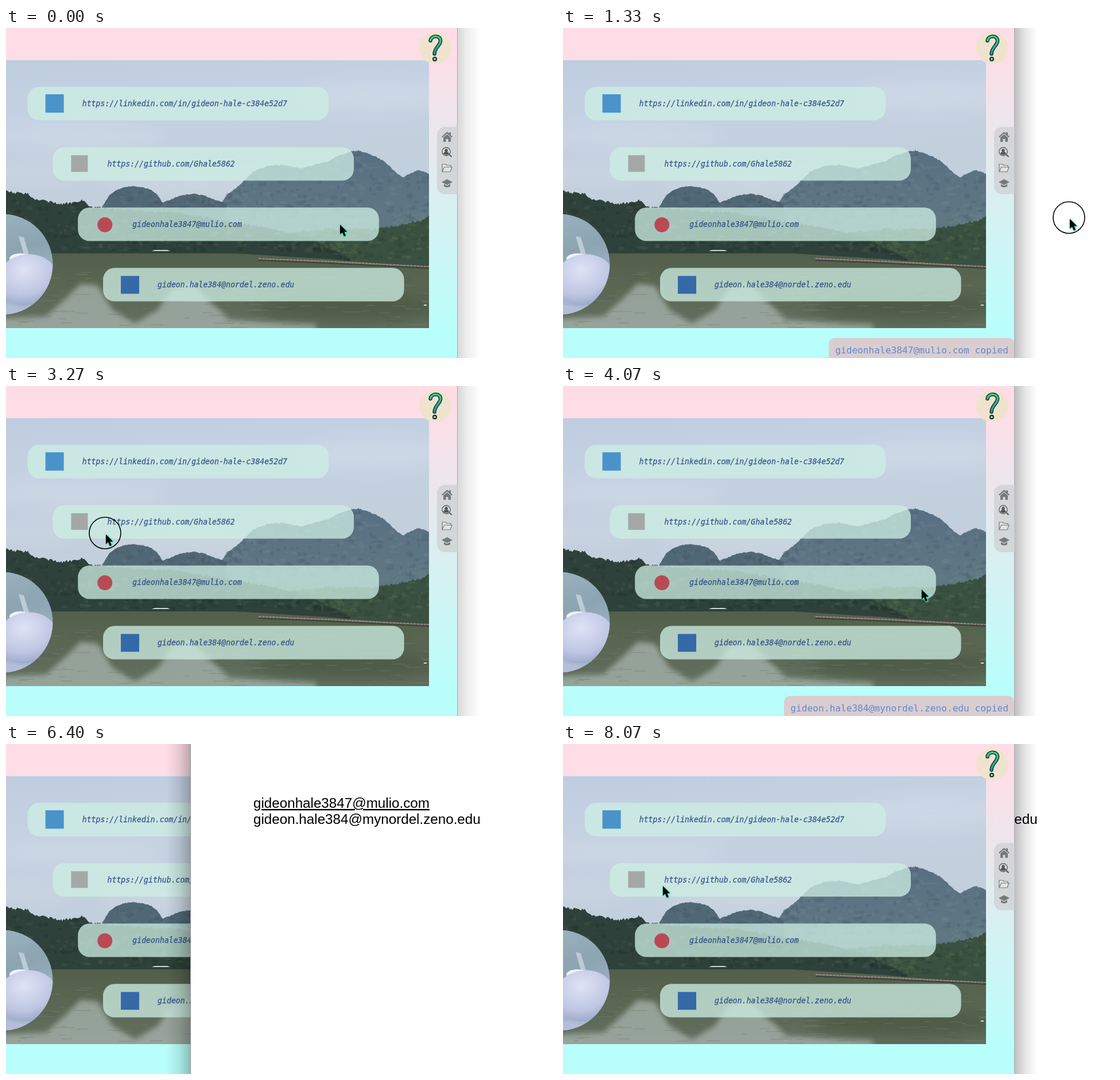
These frames come from a looping animation (960x574 px, 8270 ms). An HTML page:

```html
<!DOCTYPE html>
<html lang="en">
<head>
<meta charset="utf-8">
<title>Copy an address</title>
<style>
  html, body { margin: 0; width: 100%; height: 100%; overflow: hidden; background: #fff; }
  svg { display: block; width: 960px; height: 574px; }
  .mono { font-family: "DejaVu Sans Mono", monospace; }
  .link { font-size: 13.2px; font-style: italic; fill: #24437f; stroke: #24437f; stroke-width: .3; opacity: .86; }
  #toastText { font-size: 16.18px; fill: #6089d0; text-anchor: end; }
  #doc text { font: 24.2px "Liberation Sans", Arial, sans-serif; }
  .soft { filter: blur(14px); }
  .mist { filter: blur(5px); }
  .glow { filter: drop-shadow(0 0 1.5px #3fd9c0) drop-shadow(1px 1px 1px #5fe6d0); }
</style>
</head>
<body>
<svg id="stage" viewBox="0 0 960 574">
  <defs>
    <linearGradient id="page" x2="0" y2="1">
      <stop offset=".06" stop-color="#ffdde6"/><stop offset=".93" stop-color="#b8fffb"/>
    </linearGradient>
    <linearGradient id="sky" x2=".2" y2="1">
      <stop stop-color="#bfcde0"/><stop offset=".3" stop-color="#c5d2e3"/><stop offset=".6" stop-color="#c2cfdc"/>
    </linearGradient>
    <linearGradient id="far" x2="0" y2="1">
      <stop stop-color="#586f83"/><stop offset=".6" stop-color="#5f7882"/><stop offset="1" stop-color="#4c6460"/>
    </linearGradient>
    <linearGradient id="water" x2="0" y2="1">
      <stop stop-color="#525f4b"/><stop offset=".4" stop-color="#596652"/><stop offset="1" stop-color="#647060"/>
    </linearGradient>
    <linearGradient id="avatar" x2=".3" y2="1">
      <stop stop-color="#9fb6c4"/><stop offset=".5" stop-color="#8ca4b2"/><stop offset="1" stop-color="#a9b9cf"/>
    </linearGradient>
    <radialGradient id="toy" cx=".5" cy=".3" r=".8">
      <stop stop-color="#dfe3f5"/><stop offset=".6" stop-color="#bec6e2"/><stop offset="1" stop-color="#8f9bc0"/>
    </radialGradient>
    <linearGradient id="mark" x2="0" y2="1">
      <stop stop-color="#3ccf8e"/><stop offset="1" stop-color="#1d9c9c"/>
    </linearGradient>
    <linearGradient id="shade">
      <stop stop-opacity=".25"/><stop offset=".45" stop-opacity=".1"/><stop offset="1" stop-opacity="0"/>
    </linearGradient>
    <clipPath id="photoBox"><path d="M0 56H737V522H0z"/></clipPath>
    <clipPath id="avatarBox"><circle cx="-6" cy="411" r="87.5"/></clipPath>
  </defs>

  <g id="doc">
    <rect width="42" height="574" fill="url(#shade)" transform="matrix(-1 0 0 1 321 0)"/>
    <path d="M321 0H960V574H321z" fill="#fff"/>
    <path d="M321.5 0V574" stroke="#8d9094"/>
    <text id="line1" x="431" y="111"></text>
    <text id="line2" x="431" y="139"></text>
    <path id="caret" d="M0 0V27" stroke="#000" stroke-width="1.3"/>
  </g>

  <g id="web">
    <rect id="webShade" x="787" width="40" height="574" fill="url(#shade)"/>
    <path d="M0 0H787V574H0z" fill="url(#page)"/>
    <path d="M786.5 0V574" stroke="#a9a9b0"/>
    <g clip-path="url(#photoBox)">
      <path d="M0 56H737V400H0z" fill="url(#sky)"/>
      <g class="soft" fill="#d6deea" opacity=".45">
        <ellipse cx="130" cy="190" rx="150" ry="22"/><ellipse cx="640" cy="120" rx="130" ry="30"/>
        <ellipse cx="330" cy="270" rx="170" ry="18"/><ellipse cx="40" cy="255" rx="90" ry="14"/>
      </g>
      <g id="land"></g>
      <path d="M0 392H400L560 402 737 417V522H0z" fill="url(#water)"/>
      <path class="mist" fill="#a3b0a9" opacity=".8"
        d="M-20 506L70 502 105 470 130 445 160 448 185 490 225 514 265 490 290 452 325 445 360 480 390 508 540 514V540H-20z"/>
      <ellipse class="soft" cx="600" cy="485" rx="170" ry="24" fill="#46543f" opacity=".7"/>
      <g id="ripples"></g>
      <path d="M440 401L560 406 737 415" fill="none" stroke="#a38286" stroke-width="2" stroke-dasharray="5 1"/>
      <path d="M440 404L560 409 737 418" fill="none" stroke="#39453a" stroke-width="2"/>
      <path d="M254 388l5-2h22l5 2z" fill="#cfd8d8"/>
      <path d="M728 482h5" stroke="#cfd8d8" stroke-width="2"/>
    </g>
    <g clip-path="url(#avatarBox)">
      <path d="M-94 323H82V500H-94z" fill="url(#avatar)"/>
      <path d="M22 362l9 2 10 33-8 3z" fill="#bccbd6"/>
      <ellipse cx="25" cy="401" rx="19" ry="9" fill="#eef3fa"/>
      <ellipse cx="36" cy="438" rx="53" ry="44" fill="url(#toy)" transform="rotate(-14 36 438)"/>
      <path d="M-94 484Q10 470 60 500H-94z" fill="#b4bed9"/>
    </g>
    <g id="pills"></g>

    <circle cx="748" cy="35" r="28" fill="#f0e3cd"/>
    <g fill="none" stroke-linecap="round" stroke-linejoin="round">
      <path d="M739.500 22C741 12 758 12 757 23C756 31 747 34 746.500 45" stroke="#14282d" stroke-width="6.400"/>
      <path d="M739.500 22C741 12 758 12 757 23C756 31 747 34 746.500 45" stroke="url(#mark)" stroke-width="3.500"/>
      <circle cx="747" cy="54" r="3" fill="#8ee0d0" stroke="#14282d" stroke-width="2"/>
    </g>

    <path d="M787 172H765a14 14 0 0 0-14 14V275a14 14 0 0 0 14 14H787z" fill="#cfcfd0" fill-opacity=".72"/>
    <g fill="#747a7b">
      <path d="M759 189l9.500-8.500 3.500 3v-2h3v5l3 2.500-1.500 1.500-8-7-8 7z"/>
      <path d="M762 190.500l6.500-5.500 6.500 5.500V198h-4.500v-5h-4v5H762z"/>
      <circle cx="767" cy="215" r="7.200" fill="none" stroke="#5d6566" stroke-width="1.400"/>
      <circle cx="767" cy="213" r="2.700" fill="#4f5758"/>
      <path d="M762 219q1-4 5-4t5 4q-5 3.500-10 0z" fill="#4f5758"/>
      <path d="M772.500 220.500l4 3.500" stroke="#4f5758" stroke-width="2.200"/>
      <path d="M760 250V237h6l2 2h7v3M760 250l3.500-8H777l-3 8z" fill="#e2e4e4" stroke="#747a7b" stroke-width="1.200"/>
      <path d="M759 268l9.500-5 9.500 5-9.500 5z"/>
      <path d="M763 271.500l5.500 3 5.500-3v4q-5.500 3.500-11 0z"/>
    </g>
    <g id="toast">
      <path id="toastBox" fill="#dacdcf"/>
      <text id="toastText" class="mono" x="776" y="566"></text>
    </g>
  </g>

  <g id="pointer">
    <circle id="ring" cx="-1.5" cy="-2.300" r="27.500" fill="none" stroke="#000" stroke-width="1.600"/>
    <path id="arrow" class="glow" d="M0 0V17L4 13.500 7 20.500 10 19 7.300 12.500H12.500z"/>
    <path id="beam" class="glow" d="M-5-9.500Q-1-9.500 0-7Q1-9.500 5-9.500M-5 9.500Q-1 9.500 0 7Q1 9.500 5 9.500M0-7V7M-2.500 1H2.500"
      fill="none" stroke="#000" stroke-width="1.500"/>
  </g>
</svg>

<script>
const $ = id => document.getElementById(id);
const MAIL = 'gideonhale3847@mulio.com';
const SCHOOL = 'gideon.hale384@mynordel.zeno.edu';
const LOOP = 8270;

let seed = 7;
const rand = () => (seed = seed * 16807 % 2147483647) / 2147483647;

// Piecewise height of a ridge given as x,y pairs
function heightAt(points, x) {
  for (let i = 2; i < points.length; i += 2) {
    if (x <= points[i]) {
      const [x0, y0, x1, y1] = points.slice(i - 2, i + 2);
      return y0 + (y1 - y0) * (x - x0) / (x1 - x0);
    }
  }
  return points.at(-1);
}

function ridge(points, fill, rough) {
  const start = points[0], end = points.at(-2);
  let d = `M${start} 420`;
  for (let x = start; x <= end; x += 2) {
    d += `L${x} ${(heightAt(points, x) + (rand() - .5) * rough).toFixed(1)}`;
  }
  return `<path d="${d}V420z" fill="${fill}"/>`;
}

function foliage(points, count, tones, drop) {
  let out = '';
  for (let i = 0; i < count; i++) {
    const x = points[0] + rand() * (points.at(-2) - points[0]);
    const top = heightAt(points, x) + 4;
    const y = top + rand() * Math.max(0, drop - top);
    const [rx, ry] = [2 + rand() * 5, 1.5 + rand() * 3].map(r => r.toFixed(1));
    out += `<ellipse cx="${x.toFixed(1)}" cy="${y.toFixed(1)}" rx="${rx}" ry="${ry}" fill="${tones[i % tones.length]}" opacity=".4"/>`;
  }
  return out;
}

const far = [370, 312, 385, 290, 405, 275, 430, 250, 455, 240, 480, 238, 515, 244, 560, 232, 580, 222,
  600, 215, 615, 213, 640, 222, 660, 232, 680, 252, 692, 260, 705, 252, 720, 247, 738, 254];
const hills = [166, 314, 180, 291, 192, 282, 205, 277, 222, 275, 238, 277, 252, 281, 264, 290, 273, 304,
  288, 298, 303, 292, 325, 288, 345, 291, 358, 297, 385, 305];
const leftTrees = [0, 284, 20, 287, 40, 289, 52, 299, 75, 302, 98, 307, 118, 303, 132, 299, 150, 312,
  200, 316, 300, 322, 440, 345, 520, 362, 600, 402];
const rightTrees = [380, 362, 480, 358, 560, 350, 640, 350, 690, 342, 720, 336, 738, 326];
$('land').innerHTML =
  ridge(far, 'url(#far)', 2) + foliage(far, 260, ['#4b6274', '#6b838d'], 340) +
  ridge(hills, '#506875', 1.5) + foliage(hills, 90, ['#435a66', '#5c737d'], 318) +
  ridge(rightTrees, '#3a5141', 5) + foliage(rightTrees, 260, ['#2c4033', '#4f6749', '#33493a'], 402) +
  ridge(leftTrees, '#2e413b', 5) + foliage(leftTrees, 380, ['#22332e', '#435848', '#2a3d35'], 388);

let ripples = '';
for (let i = 0; i < 170; i++) {
  const y = 422 + rand() * 100, w = 6 + rand() * 30;
  ripples += `<path d="M${(rand() * 737).toFixed(1)} ${y.toFixed(1)}h${w.toFixed(1)}" stroke="${i % 2 ? '#9aa79b' : '#3e4b3a'}" opacity=".25"/>`;
}
$('ripples').innerHTML = ripples;

const badges = [
  '<rect x="31" y="13" width="32" height="32" fill="#4a93ca"/>',
  '<rect x="32" y="14" width="29" height="29" fill="#a3a8a6"/>',
  '<circle cx="47" cy="30" r="13" fill="#b84a53"/>',
  '<rect x="31" y="14" width="32" height="31" fill="#3569a8"/>'
];
const links = [
  'https://linkedin.com/in/gideon-hale-c384e52d7',
  'https://github.com/Ghale5862',
  MAIL,
  'gideon.hale384@nordel.zeno.edu'
];
$('pills').innerHTML = links.map((link, i) => `
  <g transform="translate(${37.7 + i * 43.8} ${102.3 + i * 105})">
    <rect width="524.5" height="58.300" rx="20" fill="#ceeee4" fill-opacity=".76"/>
    ${badges[i]}<text class="mono link" x="95" y="34">${link}</text>
  </g>`).join('');

// Pointer stops: time, x, y
const stops = [
  [0, 582, 342], [550, 582, 342], [870, 770, 338], [1080, 922, 332], [1300, 883, 332], [1500, 883, 332],
  [1780, 852, 298], [2720, 852, 298], [3180, 174, 258], [3380, 174, 258], [3680, 400, 447], [3850, 400, 447],
  [4300, 862, 256], [6700, 862, 256], [7200, 174, 247], [LOOP, 174, 247]
];
const presses = [[230, 380], [1270, 1420], [3230, 3400], [3710, 3840], [4300, 4440], [7240, 7420]];
const toasts = [[330, 3000, MAIL], [3780, 6500, SCHOOL]];

const between = (t, a, b) => t >= a && t < b;
const clamp = v => Math.max(0, Math.min(1, v));
const show = (id, on) => $(id).setAttribute('visibility', on ? 'visible' : 'hidden');
const setText = (id, text) => { if ($(id).textContent !== text) $(id).textContent = text; };

function pointerAt(t) {
  const i = Math.max(1, stops.findIndex(s => s[0] > t));
  const [t0, x0, y0] = stops[i - 1], [t1, x1, y1] = stops[i];
  const k = (t - t0) / (t1 - t0), e = k * k * (3 - 2 * k);
  return [x0 + (x1 - x0) * e, y0 + (y1 - y0) * e];
}

// Fills in the pasted lines and tells whether the caret is lit
function drawDocument(t) {
  const entered = t >= 5100, pasted = t >= 5310;
  setText('line1', t >= 2600 ? MAIL : '');
  setText('line2', pasted ? SCHOOL : '');
  $('line1').setAttribute('text-decoration', entered ? 'underline' : 'none');
  const since = [5310, 5100, 4400, 2600, 1400].find(s => t >= s) ?? 0;
  const line = $(entered ? 'line2' : 'line1');
  const x = 432 + (line.textContent ? line.getComputedTextLength() : 0);
  $('caret').setAttribute('transform', `translate(${x} ${entered ? 118 : 90})`);
  return (t - since) % 1100 < 550;
}

function drawToast(t) {
  const active = toasts.find(([a, b]) => between(t, a, b));
  $('toast').setAttribute('opacity', active ? Math.min(clamp((t - active[0]) / 150), clamp((active[1] - t) / 200)) : 0);
  if (!active) return;
  setText('toastText', active[2] + ' copied');
  const left = 776 - (active[2].length + 7) * 9.74 - 11;
  $('toastBox').setAttribute('d', `M${left} 574V551q0-12 12-12H774q12 0 12 12V574z`);
}

function frame(now) {
  const t = now % LOOP;
  const docFront = between(t, 1400, 3250) || between(t, 4400, 7260);
  const [back, front] = docFront ? [$('web'), $('doc')] : [$('doc'), $('web')];
  if (back.nextElementSibling !== front) $('stage').insertBefore(back, front);

  const caretOn = drawDocument(t);
  show('caret', docFront && caretOn);
  drawToast(t);
  const raised = t < 3000 ? 250 : t < 7000 ? 3270 : 7270;
  $('webShade').setAttribute('opacity', .6 + .4 * clamp((t - raised) / 300));

  const [x, y] = pointerAt(t);
  const hidden = between(t, 2520, 2740) || between(t, 5100, 6800);
  const beam = docFront && x > 321;
  $('pointer').setAttribute('transform', `translate(${x} ${y})`);
  show('ring', presses.some(([a, b]) => between(t, a, b)));
  show('arrow', !hidden && !beam);
  show('beam', !hidden && beam);
  requestAnimationFrame(frame);
}
requestAnimationFrame(frame);
</script>
</body>
</html>
```
